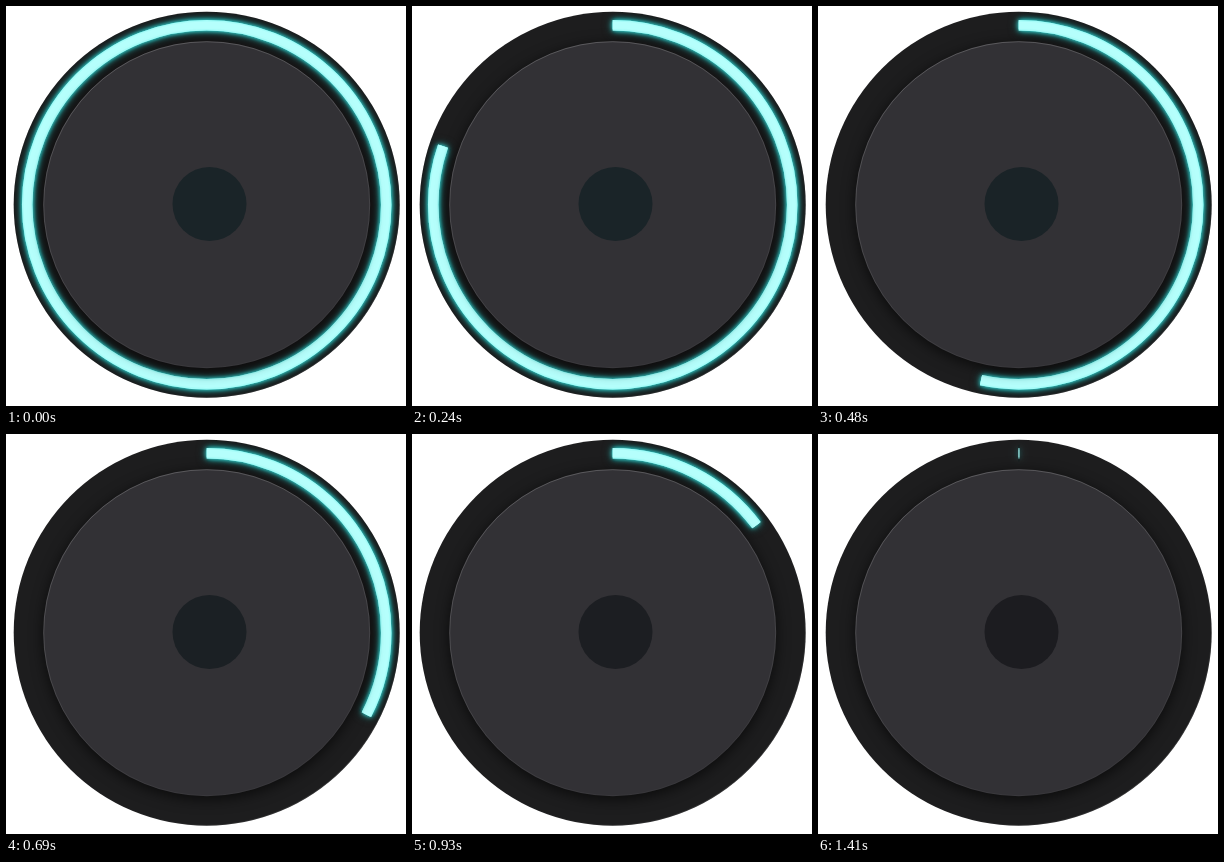
These frames come from a looping animation (400x400 px, 1.44 s). An HTML page with a canvas:

```html
<!DOCTYPE html>
<html>
<head>
<meta charset="utf-8">
<style>
  html, body { margin: 0; width: 100%; height: 100%; overflow: hidden; background: #fff; }
  canvas { display: block; width: 400px; height: 400px; }
</style>
</head>
<body>
<canvas id="stage" width="400" height="400"></canvas>
<script>
const ctx = document.getElementById('stage').getContext('2d');
const LOOP = 1440, STEP = 30, CX = 200.7, CY = 198.7, TAU = Math.PI * 2;

const bezier = (a, b, u) => 3 * u * (1 - u) ** 2 * a + 3 * u * u * (1 - u) * b + u ** 3;

// cubic-bezier(.2, .1, .48, 1), solved by bisection
function ease(x) {
  let lo = 0, hi = 1;
  for (let i = 0; i < 24; i++) {
    const mid = (lo + hi) / 2;
    if (bezier(0.2, 0.48, mid) < x) lo = mid; else hi = mid;
  }
  return bezier(0.1, 1, lo);
}

function disc(x, y, r, fill) {
  ctx.beginPath();
  ctx.arc(x, y, r, 0, TAU);
  ctx.fillStyle = fill;
  ctx.fill();
}

function arc(r, width, color, sweep = TAU) {
  ctx.beginPath();
  ctx.arc(CX, CY, r, -TAU / 4, sweep - TAU / 4);
  ctx.lineWidth = width;
  ctx.strokeStyle = color;
  ctx.stroke();
}

function shadow(color, blur, y = 0) {
  ctx.shadowColor = color;
  ctx.shadowBlur = blur;
  ctx.shadowOffsetY = y;
}

function fade(x0, y0, x1, y1, from, to) {
  const g = ctx.createLinearGradient(x0, y0, x1, y1);
  g.addColorStop(0, from);
  g.addColorStop(1, to);
  return g;
}

function draw(time) {
  const left = 1 - ease(time / LOOP), sweep = left * TAU;
  ctx.clearRect(0, 0, 400, 400);
  disc(CX, CY, 193, '#1d1d1e');

  ctx.save();
  ctx.beginPath();
  ctx.arc(CX, CY, 193, 0, TAU);
  ctx.clip();
  arc(192.7, 1, fade(250, 250, 350, 350, 'rgba(255,255,255,0)', 'rgba(255,255,255,.12)'));
  shadow('rgba(0,0,0,.8)', 14);
  arc(179.5, 17, '#0b1516', sweep);
  shadow('#35d5d2', 9);
  arc(179.5, 10.5, '#8df3ef', sweep);
  shadow('#35d5d2', 4);
  arc(179.5, 10.5, '#a5fcf8', sweep);
  shadow('transparent', 0);
  arc(179.5, 7.5, '#b5fffc', sweep);
  ctx.restore();

  shadow('rgba(0,0,0,.65)', 14, 3);
  disc(CX, CY, 163.5, '#323135');
  shadow('transparent', 0);
  arc(163, 1, fade(130, 40, 230, 360, 'rgba(255,255,255,.2)', 'rgba(255,255,255,.03)'));

  const tint = Math.min(1, left * 1.6);
  disc(203.5, 198, 37, `rgb(${28 - 2 * tint},${28 + 8 * tint},${32 + 8 * tint})`);
}

function tick() {
  const t = performance.now() % LOOP;
  draw(Math.floor(t / STEP) * STEP);
  requestAnimationFrame(tick);
}
tick();
</script>
</body>
</html>
```
